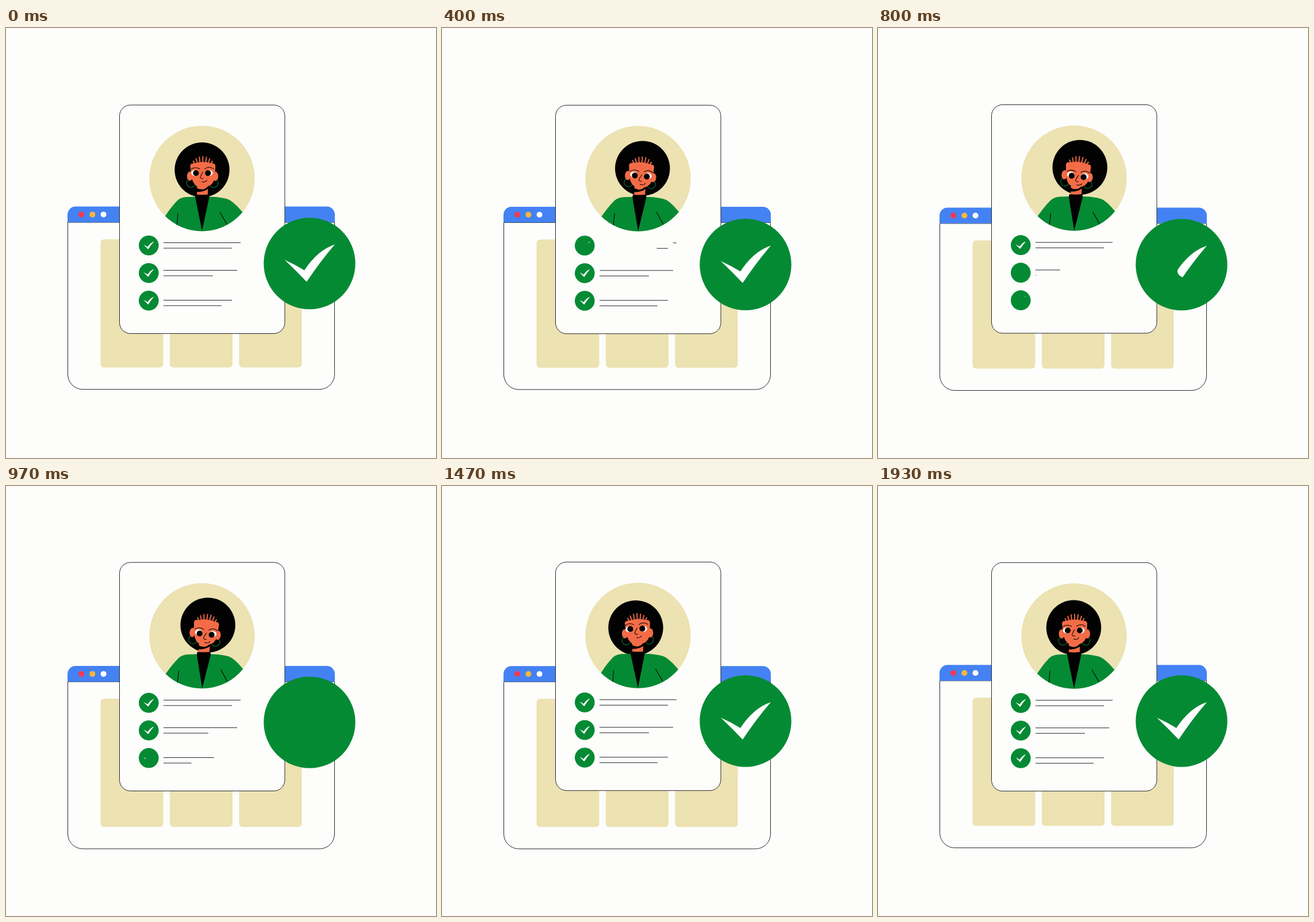
An HTML page with a canvas for the animation above (1.96 s loop, 748 by 748 pixels).

```html
<!DOCTYPE html>
<html>
<head>
<meta charset="utf-8">
<title>Profile check</title>
<style>
html, body { margin: 0; width: 100%; height: 100%; overflow: hidden; background: #fdfdfb; }
canvas { display: block; }
</style>
</head>
<body>
<canvas id="stage" width="748" height="748"></canvas>
<script>
const ctx = document.getElementById('stage').getContext('2d');
const LOOP = 1960, SWAY = 2200, TAU = Math.PI * 2;
const PAPER = '#fdfdfb', INK = '#25252d', GREEN = '#058a34', SAND = '#ece2b2',
      BLUE = '#4482f3', SKIN = '#f36c47', BLACK = '#020202', WHITE = '#fefefe';

const clamp = v => Math.max(0, Math.min(1, v));
const span = (t, start, length) => clamp((t - start) / length);
const cubic = p => p < .5 ? 4 * p ** 3 : 1 - 4 * (1 - p) ** 3;
const sine = p => (1 - Math.cos(Math.PI * p)) / 2;
const wave = (t, peak, period = SWAY) => Math.cos(TAU * (t - peak) / period);

const tick = new Path2D('M-43-6Q-25 2-9 12Q14-23 44-33Q19-4-5 32Q-24 12-43-6Z');
const tickSpine = new Path2D('M-46-9L-6 22L46-36');
const SPINE = 128.4;

function group(draw) {
  ctx.save();
  draw();
  ctx.restore();
}

function fill(color, d) {
  ctx.fillStyle = color;
  ctx.fill(new Path2D(d));
}

function stroke(color, width, d) {
  ctx.strokeStyle = color;
  ctx.lineWidth = width;
  ctx.stroke(new Path2D(d));
}

function disc(color, x, y, rx, ry = rx) {
  ctx.fillStyle = color;
  ctx.beginPath();
  ctx.ellipse(x, y, rx, ry, 0, 0, TAU);
  ctx.fill();
}

function box(x, y, w, h, r, color, line) {
  ctx.beginPath();
  ctx.roundRect(x, y, w, h, r);
  ctx.fillStyle = color;
  ctx.fill();
  if (!line) return;
  ctx.strokeStyle = line;
  ctx.lineWidth = 1;
  ctx.stroke();
}

// Part of a straight line, from share a to share b
function segment(x1, y1, x2, y2, a, b) {
  if (b <= a) return;
  const at = p => `${x1 + (x2 - x1) * p} ${y1 + (y2 - y1) * p}`;
  stroke(INK, 1, `M${at(a)}L${at(b)}`);
}

function check(x, y, radius, scale, from, to) {
  disc(GREEN, x, y, radius);
  if (to - from < .01) return;
  group(() => {
    ctx.translate(x, y);
    ctx.scale(scale, scale);
    if (from === 0 && to === 1) {
      ctx.fillStyle = WHITE;
      ctx.fill(tick);
      return;
    }
    ctx.clip(tick);
    ctx.strokeStyle = WHITE;
    ctx.lineWidth = 23;
    ctx.lineCap = 'round';
    ctx.setLineDash([SPINE * (to - from), 999]);
    ctx.lineDashOffset = -SPINE * from;
    ctx.stroke(tickSpine);
  });
}

// Wiped from its start, then drawn again: [from, to]
function redraw(t, wipe, wipeTime, draw, drawTime) {
  return t < draw ? [cubic(span(t, wipe, wipeTime)), 1] : [0, cubic(span(t, draw, drawTime))];
}

function browser(t) {
  group(() => {
    ctx.translate(0, 1.5 * (1 - wave(t, 130)));
    box(107.5, 338, 464, 290.5, [0, 0, 26, 26], PAPER, INK);
    box(107, 310.5, 465, 27.3, [14, 14, 0, 0], BLUE);
    ['#f4394f', '#f8b83a', WHITE].forEach((c, i) => disc(c, 131 + 19.3 * i, 324.3, 5));
    for (let i = 0; i < 3; i++) box(164.5 + 120.5 * i, 367.5, 109, 223, 6, SAND);
  });
}

function eye(x, side, u, blink) {
  if (blink < .9) {
    group(() => {
      ctx.translate(x, 252 + 4 * blink);
      ctx.scale(1, 1 - blink);
      disc(WHITE, side * 2, -.12 * u, 6.3, 5);
      disc(BLACK, 0, .05 * u, 5.1);
    });
  }
  if (blink > .5) {
    disc(WHITE, x + side * 3, 253.5, 4.5, 1.2);
    stroke(BLACK, 1.6, `M${x - 6} 253Q${x} 257 ${x + 6} 253`);
  }
}

function face(u, blink) {
  group(() => {
    ctx.translate(342, 300);
    ctx.rotate(.6 * u * Math.PI / 180);
    ctx.translate(-342, -300);
    disc(SKIN, 319.5, 258, 5, 8);
    disc(SKIN, 364, 258, 5, 8);
    stroke('#0c6b30', 1.2, 'M317 264A7.5 7.5 0 1 0 328 266M366 264A7.5 7.5 0 1 1 355 266');
    fill(SKIN, 'M320 239Q323 235 329 235Q342 231 356 235Q362 235 364 239L363 258Q362 272 350 276Q340 280 331 275Q324 269 322 258Z');
    for (let i = 0; i < 9; i++) {
      const a = Math.PI * (1.13 + .0925 * i), c = Math.cos(a), s = Math.sin(a);
      stroke(SKIN, 1.9, `M${342 + 16 * c} ${245 + 9 * s}L${342 + 22 * c} ${245 + 22 * s}`);
    }
    ctx.translate(.2 * u, .55 * u);
    eye(330, -1, u, blink);
    eye(351, 1, u, blink);
    stroke(BLACK, 1, 'M321 246Q328 240 337 245M345 245Q353 239 361 245');
    stroke(BLACK, 1, 'M342 250Q338 257 337.5 260Q340 263 343 261M340 267Q347 269 349.5 264');
  });
}

function portrait(t) {
  const rise = sine(((t - 1540 + LOOP) % LOOP) / 1120);
  const fall = 1 - sine(span(t, 960, 580));
  const u = -4 + 14.7 * (t < 700 || t > 1540 ? rise : fall);
  const blink = clamp(1.6 * (1 - Math.abs(t - 1170) / 110));
  group(() => {
    disc(SAND, 341, 261.7, 91.7);
    ctx.beginPath();
    ctx.arc(341, 261.7, 91.7, 0, TAU);
    ctx.clip();
    disc(BLACK, 340.5 + u, 247 - .38 * u, 47.7);
    group(() => {
      ctx.transform(1, 0, -.004 * u, 1, 1.44 * u, 0);
      fill(SKIN, 'M332 268H351V291H332Z');
      fill(BLACK, 'M331 278Q343 285 351 275V280Q343 286 331 285Z');
      fill(GREEN, 'M270 338Q285 313 298 300Q304 294.5 314 294L329 293.5H354Q379 294 390 300Q401 307 415 325V360H270Z');
      fill(BLACK, 'M330 289.5Q341 291 352 289.5L353.5 294L341 353L329 294Z');
      stroke(BLACK, 1.1, 'M299 322L297.5 343M372 320L384 341');
    });
    face(u, blink);
  });
}

// Row height, then for each line its height, right end and start time
const rows = [
  { y: 378.2, lines: [[373.5, 408, 169], [383, 393, 204]], wipe: 250, draw: 640 },
  { y: 426.2, lines: [[421.5, 402, 370], [431, 360, 457]], wipe: 400, draw: 790 },
  { y: 474.2, lines: [[473.5, 393, 492], [483, 375, 523]], wipe: 635, draw: 895 }
];

function card(t) {
  group(() => {
    ctx.translate(0, .35 - 1.05 * (1 - wave(t, 300)));
    box(197.5, 134, 287.5, 397.5, 19, PAPER, INK);
    portrait(t);
    for (const { y, lines, wipe, draw } of rows) {
      check(248.3, y, 17.3, .21, ...redraw(t, wipe, 200, draw, 250));
      for (const [ly, end, start] of lines)
        segment(274, ly, end, ly, ...redraw(t, start, 300, start + 300, 300));
    }
  });
}

const sparks = [[566, 308, 568, 285], [578, 312.5, 602, 293], [578, 326.6, 600, 328.4]];

function badge(t) {
  const head = sine(span(t, 1040, 195)), tail = sine(span(t, 1110, 240));
  for (const s of sparks) segment(...s, tail, head);
  check(528, 410.2 + 1.6 * wave(t, 650, 2100), 79.7, 1, ...redraw(t, 700, 200, 1010, 320));
}

function frame(now) {
  const t = now % LOOP;
  ctx.fillStyle = PAPER;
  ctx.fillRect(0, 0, 748, 748);
  browser(t);
  card(t);
  badge(t);
  requestAnimationFrame(() => frame(performance.now()));
}
frame(0);
</script>
</body>
</html>
```
